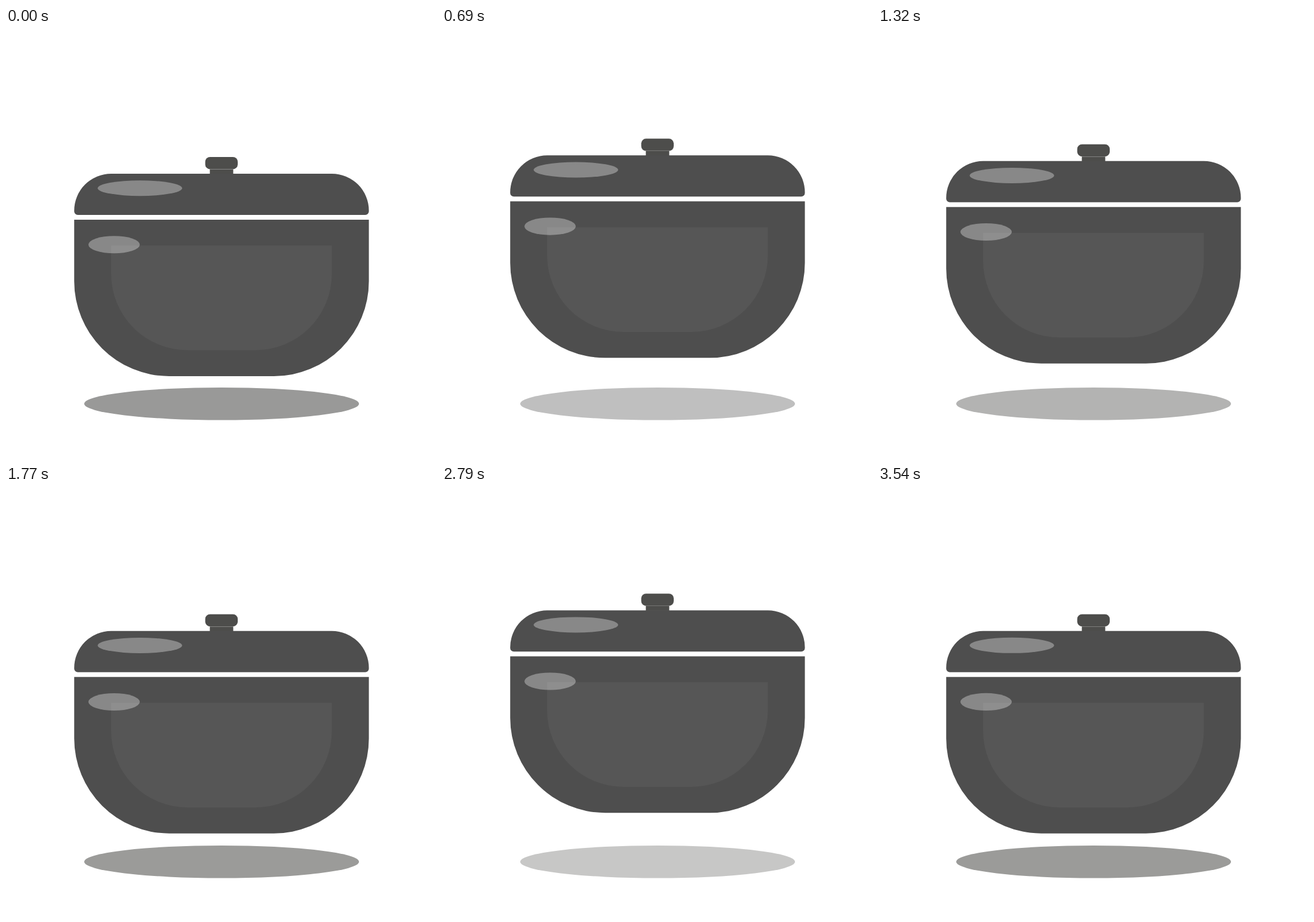
Animation of 720x720 px, one loop 3.57 s. Source, as an HTML page:

```html
<!DOCTYPE html>
<html lang="en">
<head>
<meta charset="utf-8">
<title>Floating pot</title>
<style>
  html, body { margin: 0; width: 100%; height: 100%; overflow: hidden; background: #fff; }
  svg { display: block; width: 100%; height: 100%; }
</style>
</head>
<body>
<svg viewBox="0 0 720 720">
  <ellipse id="shadow" cx="361" cy="629.2" rx="230" ry="27.3" fill="#333330" opacity=".5"/>
  <g id="pot" fill="#4e4e4e">
    <rect x="333.6" y="216" width="54.4" height="20.5" rx="8" fill="#4d4d4b"/>
    <rect x="341.3" y="236.7" width="39.2" height="8" fill="#4d4d4b"/>
    <path d="M114.2 306a62 62 0 0 1 62-62H545.6a62 62 0 0 1 62 62v1a6 6 0 0 1-6 6H120.2a6 6 0 0 1-6-6z"/>
    <path d="M114.2 321H607.6V424a159 159 0 0 1-159 159H273.2a159 159 0 0 1-159-159z"/>
    <path d="M176 364.4H545.6V411.6a128 128 0 0 1-128 128H304a128 128 0 0 1-128-128z" fill="#565656"/>
    <g fill="#fff" fill-opacity=".33">
      <ellipse cx="224.2" cy="268.2" rx="70.7" ry="13"/>
      <ellipse cx="181" cy="362.8" rx="43" ry="14.6"/>
    </g>
  </g>
</svg>
<script>
  const LOOP = 3570, HALF = 900, HEIGHT = 40;
  const pot = document.getElementById('pot');
  const shadow = document.getElementById('shadow');

  // Linear rise and fall, twice per loop; the last fall is slightly shorter.
  function liftAt(t) {
    if (t >= 3 * HALF) return (LOOP - t) / (LOOP - 3 * HALF);
    return 1 - Math.abs(t % (2 * HALF) - HALF) / HALF;
  }

  function draw() {
    const lift = liftAt(performance.now() % LOOP);
    pot.setAttribute('transform', `translate(0 ${-HEIGHT * lift})`);
    shadow.setAttribute('opacity', 0.5 - 0.25 * lift);
    requestAnimationFrame(draw);
  }
  draw();
</script>
</body>
</html>
```
